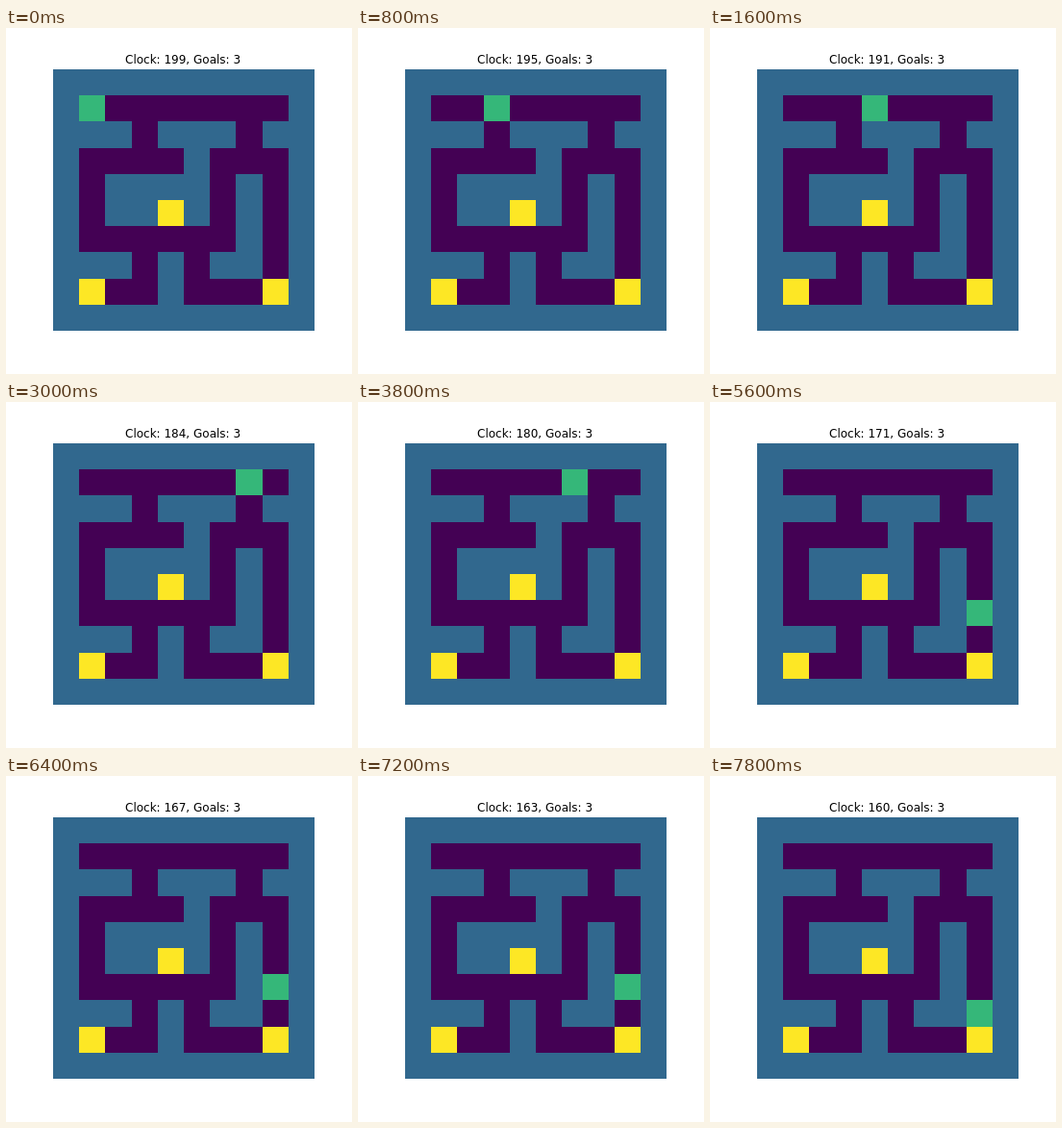
An HTML page with a canvas for the animation above (8 s loop, 360 by 360 pixels).

```html
<!DOCTYPE html>
<html lang="en">
<head>
<meta charset="utf-8">
<title>Maze walk</title>
<style>
  html, body { margin: 0; width: 100%; height: 100%; overflow: hidden; background: #fff; }
  canvas { display: block; }
</style>
</head>
<body>
<canvas id="stage" width="360" height="360"></canvas>
<script>
const ctx = document.getElementById('stage').getContext('2d');
const STEP_MS = 200;
const START_CLOCK = 199;
const COLORS = { '#': '#31688e', '.': '#440154', G: '#fde725', A: '#35b779' };

const MAZE = [
  '##########',
  '#........#',
  '###.###.##',
  '#....#...#',
  '#.####.#.#',
  '#.##G#.#.#',
  '#......#.#',
  '###.#.##.#',
  '#G..#...G#',
  '##########'
];

// One letter per step; a dot means the walker waits.
const MOVES = '.R.R..R.' + '..R.R.R.' + '..LRDDRD' + '.D.D.D.U' + '.....D.';
const DELTA = { R: [1, 0], L: [-1, 0], U: [0, -1], D: [0, 1], '.': [0, 0] };

const path = [[1, 1]];
for (const move of MOVES) {
  const [col, row] = path[path.length - 1];
  const [dx, dy] = DELTA[move];
  path.push([col + dx, row + dy]);
}

const edge = i => Math.round(i * 27.2);

function drawCell(col, row, kind) {
  ctx.fillStyle = COLORS[kind];
  ctx.fillRect(49 + edge(col), 43 + edge(row),
    edge(col + 1) - edge(col), edge(row + 1) - edge(row));
}

function draw(step) {
  ctx.fillStyle = '#fff';
  ctx.fillRect(0, 0, 360, 360);
  MAZE.forEach((line, row) => [...line].forEach((kind, col) => drawCell(col, row, kind)));
  drawCell(...path[step], 'A');
  ctx.fillStyle = '#000';
  ctx.font = '12px "DejaVu Sans", sans-serif';
  ctx.fillText(`Clock: ${START_CLOCK - step}, Goals: 3`, 124, 37);
}

const start = performance.now();
function tick() {
  const elapsed = performance.now() - start;
  draw(Math.floor(elapsed / STEP_MS) % path.length);
  requestAnimationFrame(tick);
}
tick();
</script>
</body>
</html>
```
